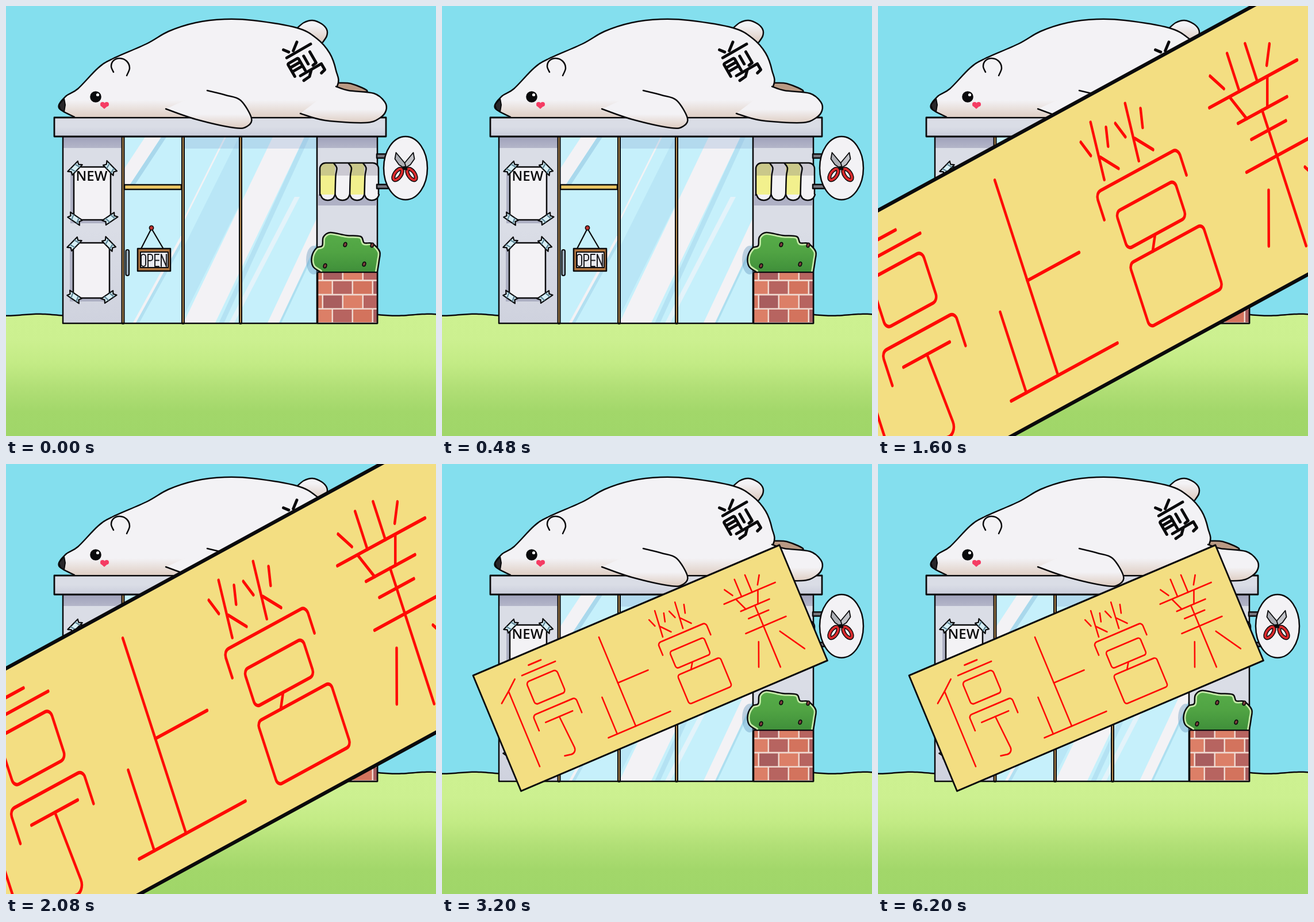
An HTML page with a canvas that plays this animation: 748 by 748 pixels, repeating every 8200 ms.

```html
<!DOCTYPE html>
<html lang="zh-Hant">
<head>
<meta charset="utf-8">
<title>停止營業</title>
<style>
html, body { margin: 0; width: 100%; height: 100%; overflow: hidden; background: #84dfee; }
canvas { display: block; width: 100vw; height: 100vh; }
</style>
</head>
<body>
<canvas id="stage" width="748" height="748"></canvas>
<script>
const SIZE = 748, LOOP = 8200, STEP = 800;
const INK = '#0a0a0c', WHITE = '#f3f2f5', WALL = '#dadde6', GLASS = '#c6f0fb', BEIGE = '#dac6b9';
const stage = document.getElementById('stage').getContext('2d');
const shop = document.createElement('canvas');
shop.width = shop.height = SIZE;
let g = shop.getContext('2d');

function paint(path, fill, line, width = 2.5) {
  if (fill) { g.fillStyle = fill; g.fill(path); }
  if (line) { g.strokeStyle = line; g.lineWidth = width; g.stroke(path); }
}

const points = s => s.split(' ').map(p => p.split(',').map(Number));

// Smooth open curve through the given points
function curve(s) {
  const p = points(s), last = p.length - 1, path = new Path2D();
  const at = i => p[Math.max(0, Math.min(last, i))];
  path.moveTo(...p[0]);
  for (let i = 0; i < last; i++) {
    const [a, b, c, d] = [at(i - 1), at(i), at(i + 1), at(i + 2)];
    path.bezierCurveTo(b[0] + (c[0] - a[0]) / 6, b[1] + (c[1] - a[1]) / 6,
      c[0] - (d[0] - b[0]) / 6, c[1] - (d[1] - b[1]) / 6, ...c);
  }
  return path;
}

function poly(s, fill, line, width) {
  const path = new Path2D();
  points(s).forEach(p => path.lineTo(...p));
  path.closePath();
  paint(path, fill, line, width);
}

function box(x, y, w, h, r = 0) {
  const path = new Path2D();
  path.roundRect(x, y, w, h, r);
  return path;
}

function oval(x, y, rx, ry, fill, line, width, turn = 0) {
  const path = new Path2D();
  path.ellipse(x, y, rx, ry, turn, 0, Math.PI * 2);
  paint(path, fill, line, width);
}

const rect = (x, y, w, h, fill, line, width) => paint(box(x, y, w, h), fill, line, width);

// Lettering strokes in the current pen
function pen(color, width) { g.strokeStyle = color; g.lineWidth = width; }
function seg(x, y, ...rest) {
  g.beginPath();
  g.moveTo(x, y);
  for (let i = 0; i < rest.length; i += 2) g.lineTo(rest[i], rest[i + 1]);
  g.stroke();
}
const bar = (x, y, len) => seg(x, y, x + len, y);
const post = (x, y, len) => seg(x, y, x, y + len);
const ring = (x, y, w, h, r) => g.stroke(box(x, y, w, h, r));

// Roof shape: two short legs joined by a top with round corners
function cover(x, y, w, h, r = 7) {
  g.beginPath();
  g.moveTo(x, y + h);
  g.arcTo(x, y, x + w, y, r);
  g.arcTo(x + w, y, x + w, y + h, r);
  g.lineTo(x + w, y + h);
  g.stroke();
}

function fade(y0, y1, ...colors) {
  const f = g.createLinearGradient(0, y0, 0, y1);
  colors.forEach((c, i) => f.addColorStop(i / (colors.length - 1), c));
  return f;
}

function within(path, draw) {
  g.save();
  g.clip(path);
  draw();
  g.restore();
}

function land() {
  rect(0, 0, SIZE, SIZE, '#84dfee');
  const hill = new Path2D();
  for (let x = 0; x <= SIZE; x += 4) hill.lineTo(x, 537.3 + 1.5 * Math.cos(x / 18));
  const ground = new Path2D(hill);
  ground.lineTo(SIZE, SIZE);
  ground.lineTo(0, SIZE);
  paint(ground, fade(538, 748, '#cdf191', '#ccf090', '#c3eb85', '#b1df76', '#a2d76a', '#a0d669'));
  paint(hill, null, INK);
}

// Slanted reflection starting at (x, y) and leaning left by k
function ray(x, y, w, k, color) {
  const run = k * (551 - y);
  g.fillStyle = color;
  g.beginPath();
  g.moveTo(x, y);
  g.lineTo(x + w, y);
  g.lineTo(x + w - run, 551);
  g.lineTo(x - run, 551);
  g.fill();
}

function pane(x, y, w, h, draw) {
  within(box(x, y, w, h), () => {
    rect(x, y, w, h, GLASS);
    draw();
  });
}

function windows() {
  pane(205, 228, 102, 84, () => {
    ray(270, 228, 9, .66, '#a9d8ec');
    ray(242, 228, 28, .66, WHITE);
  });
  pane(205, 319, 102, 232, () => {
    ray(308, 400, 7, .55, '#b2e0f1');
    ray(304, 400, 5, .55, WHITE);
  });
  pane(308, 228, 100, 323, () => {
    ray(405, 228, 60, .5, '#b9e6f6');
    ray(380, 228, 3, .5, WHITE);
  });
  within(box(310, 228, 231, 323), () => {
    within(box(410, 228, 131, 323), () => rect(410, 228, 131, 323, GLASS));
    ray(519, 228, 9, .46, '#b4e2f3');
    ray(464, 228, 55, .48, WHITE);
    ray(502, 332, 9, .52, '#e3f3fa');
    ray(550, 366, 16, .47, '#addff0');
    ray(542, 366, 20, .47, WHITE);
    rect(308, 228, 233, 20, 'rgba(130,160,205,.28)');
  });
  for (const x of [203.5, 308, 408]) {
    pen(INK, 6);
    post(x, 228, 323);
    pen('#b58b50', 2);
    post(x, 229, 321);
  }
  rect(206, 311, 99, 8, '#edc764', INK);
  paint(box(208.5, 424, 5.5, 45, 2.7), '#9fb3c2', INK, 2.2);
}

function openSign() {
  pen(INK, 2.2);
  seg(235, 422, 253, 387, 273, 421);
  oval(253, 386, 3.6, 3.8, '#c03430', INK, 1.6);
  rect(229, 422, 57, 39, '#b0753f', INK);
  rect(234, 428, 48, 27, '#e9eaf0', INK, 2);
  oval(239, 443, 3.8, 10.5);
  pen('#1c1c20', 2);
  ring(235, 432, 8, 21, 4);
  post(247, 432, 22);
  ring(247, 432, 8, 11, [0, 4, 4, 0]);
  post(259, 432, 21);
  for (let i = 0; i < 3; i++) bar(259, 432 + i * 10.5, 7);
  seg(270, 453, 270, 432, 279, 453, 279, 432);
}

function tape(x, y, turn) {
  g.save();
  g.translate(x, y);
  g.rotate(turn);
  poly('-13,-5 12,-5 9,0 13,5 -12,5 -9,0', '#d5eef6', INK, 2.2);
  pen('#5d8494', 2.2);
  for (const dx of [-6, 5]) seg(dx, -4, dx + 2, 4);
  g.restore();
}

function poster(x, y, w, h) {
  rect(x - 6, y + 4, w + 4, h + 2, '#adb0c3');
  rect(x, y, w, h, WHITE, INK);
  for (const side of [0, 1])
    for (const end of [0, 1])
      tape(x + 2 + side * (w - 3), y + 2 + end * (h - 4), (side ^ end ? 1 : -1) * (end ? .6 : .8));
}

function awning() {
  rect(543, 328, 102, 19, '#afb1c5');
  const left = 547, step = 25.5;
  within(box(546, 273, 102, 65, [10, 10, 0, 0]), () => {
    for (let i = 0; i < 4; i++) rect(left + i * step, 270, step, 60, i % 2 ? WHITE : '#f2f08d');
    rect(544, 270, 106, 25, 'rgba(110,108,130,.3)');
  });
  pen(INK, 2.5);
  cover(546, 273, 102, 56, 10);
  for (let i = 0; i < 4; i++) {
    const x = left + i * step;
    paint(curve(`${x},328 ${x + 4},335 ${x + step / 2},338 ${x + step - 4},335 ${x + step},328`), WHITE, INK);
    if (i) paint(curve(`${x},328 ${x + 1},296 ${x + 3},282 ${x - 2},274`), null, INK);
  }
}

function bricks() {
  const tones = ['#d3735d', '#b76460', '#dc7f67', '#a85d5e'];
  within(box(542, 463, 104, 89), () => {
    rect(542, 463, 104, 89, '#f0d9d0');
    for (let row = 0; row < 4; row++)
      for (let i = 0; i < 4; i++)
        rect(534 + i * 35 - (row % 2 ? 0 : 17), 454 + row * 24.7, 32.5, 22, tones[(row * 2 + i * 3) % 4]);
  });
  rect(542, 463, 104, 89, null, INK);
}

function bush() {
  oval(535, 442, 13, 25, 'rgba(100,150,190,.4)');
  const leaf = curve('546,462 534,453 532,436 540,421 550,417 552,402 564,394 592,399 ' +
    '617,401 623,412 637,413 650,427 649,443 646,462');
  paint(leaf, fade(394, 463, '#57ad49', '#50a343', '#3f8f3a'));
  within(leaf, () => paint(leaf, null, '#c5e9a8', 8));
  paint(leaf, null, INK);
  for (const [x, y] of [[590, 415], [637, 416], [623, 449], [555, 452]])
    oval(x, y, 2.7, 3.8, '#7e3f3d', INK, 1.6, .3);
}

function roundSign() {
  for (const y of [261, 314]) rect(645, y - 3.5, 20, 7, '#77777f', INK);
  oval(695, 282, 38, 55, WHITE, INK);
  for (const side of [1, -1]) {
    g.save();
    g.translate(693.5, 281);
    g.scale(side, 1);
    poly('15,-26 17,-15 10,-5 -4,4 0,-8', side > 0 ? '#c2c3c8' : '#aeb0b6', INK, 1.8);
    seg(0, 2, 8, 2);
    oval(12, 12, 5.5, 11, null, INK, 7, -.6);
    oval(12, 12, 5.5, 11, null, '#da2a2c', 4, -.6);
    g.restore();
  }
  oval(693.5, 282, 4, 3.5, INK);
}

function building() {
  rect(99, 227, 547, 325, fade(227, 552, WALL, WALL, '#cfd2de'));
  for (const x of [99, 542]) rect(x, 228, 104, 19, fade(228, 247, '#a0a2bb', '#b4b6c9'));
  windows();
  pen(INK, 2.6);
  post(541, 228, 323);
  rect(99, 227, 547, 325, null, INK);
  rect(84, 194, 577, 33, fade(194, 227, WALL, WALL, '#c9ccda'), INK, 2.8);
  poster(118, 280, 64, 92);
  poster(117, 412, 63, 96);
  g.fillStyle = INK;
  g.font = '600 24px "Open Sans", sans-serif';
  g.textAlign = 'center';
  g.fillText('NEW', 149, 304);
  openSign();
  awning();
  bricks();
  bush();
  roundSign();
}

// White limb, shaded beige towards its lower edge
function limb(s, top, bottom) {
  const path = curve(s);
  paint(path, fade(top, bottom, WHITE, BEIGE), INK);
}

// The character on the bear's back, tilted with its pose
function mark() {
  g.save();
  g.translate(520, 95);
  g.rotate(-Math.PI / 6);
  pen(INK, 5);
  seg(-23, -35, -17, -27);
  seg(4, -35, -9, -25);
  bar(-25, -20, 48);
  cover(-29, -10, 21, 25, 2);
  for (const y of [-2, 6]) bar(-27, y, 18);
  post(2, -8, 16);
  seg(15, -9, 15, 13, 8, 14);
  seg(-20, 19, 22, 19, 22, 31, 14, 33);
  seg(1, 20, -7, 28, -19, 29);
  g.restore();
}

function bear() {
  paint(curve('574,134 600,135 628,149 574,150'), '#b99a84', INK);
  limb('506,39 518,29 533,25 549,31 558,41 558,52 551,63', 34, 66);
  limb('119,193 92,177 104,157 125,144 160,108 185,92 244,66 283,44 330,29 380,23 430,25 ' +
    '506,38 540,56 563,82 574,112 576,140 540,193', 164, 200);
  limb('512,187 555,199 625,203 650,195 661,182 659,167 640,152 596,147 574,140', 180, 208);
  limb('278,179 330,197 398,212 420,209 427,195 408,164 382,155 350,147', 188, 216);
  paint(curve('187,115 183,105 187,95 198,91 210,96 215,108 210,121'), WHITE, INK);
  oval(156, 158, 9.8, 9.8, INK);
  oval(159.5, 154.5, 2.6, 2.6, '#fff');
  poly('92,172 101,161 103,172 101,184 95,180', '#29272a', INK, 2);
  for (const dx of [-3, 4]) oval(171 + dx, 171, 4, 4, '#f53c63');
  poly('164,173 179,172 171,179', '#f53c63');
  mark();
}

function fire(x) {
  seg(x, 38, x + 7, 55);
  seg(x + 20, 25, x + 14, 83);
  seg(x + 37, 37, x + 32, 55);
  seg(x + 18, 61, x + 36, 80);
}

// Lettering is laid out upright, the slope comes from the transform
function lettering() {
  // 停
  seg(85, 42, 61, 61, 36, 79);
  post(61, 61, 174);
  bar(126, 26, 31);
  bar(103, 41, 83);
  ring(106, 58, 75, 52, 7);
  cover(91, 129, 106, 35);
  bar(112, 153, 67);
  g.beginPath();
  g.moveTo(146, 153);
  g.arcTo(152, 240, 123, 235, 11);
  g.lineTo(123, 235);
  g.stroke();
  // 止
  post(299, 30, 206);
  bar(299, 136, 75);
  post(253, 151, 85);
  bar(231, 236, 154);
  // 營
  fire(420);
  fire(470);
  cover(418, 91, 119, 28);
  ring(435, 118, 85, 39, 6);
  seg(474, 158, 465, 171);
  ring(431, 171, 106, 67, 6);
  // 業
  for (const side of [-1, 1]) {
    const x = u => 648.5 + side * u;
    seg(x(43), 42, x(31), 60);
    seg(x(13), 30, x(13), 70);
    seg(x(27), 71, x(15), 98);
  }
  bar(592, 70, 127);
  bar(621, 98, 71);
  bar(631, 119, 50);
  bar(612, 146, 100);
  post(656, 98, 143);
  seg(632, 173, 610, 223);
  seg(686, 170, 723, 225);
}

function banner(sx, sy, x, y) {
  g.save();
  g.transform(sx, 0, 0, sy, x, y);
  g.transform(1, -.3975, .445, 1, -73.6, 427.3);
  rect(0, 0, 760.6, 267.7, '#f3de82', INK, 3.7);
  pen('#ff0a05', 3.4);
  lettering();
  g.restore();
}

// Banner scale and offset for each step; the shop alone comes first
const poses = [
  null,
  [2.16, 2.83, -399, -790.4],
  [1.201, 1.648, -83.6, -254.7],
  [1, 1, 0, 0],
  [.7007, .7508, 105.6, 47.15]
];

g.lineCap = g.lineJoin = 'round';
land();
building();
bear();
g = stage;
g.lineCap = g.lineJoin = 'round';

const start = performance.now();
function frame() {
  const t = (performance.now() - start) % LOOP;
  const pose = poses[Math.min(poses.length - 1, Math.floor(t / STEP))];
  g.drawImage(shop, 0, 0);
  if (pose) banner(...pose);
  requestAnimationFrame(frame);
}
frame();
</script>
</body>
</html>
```
